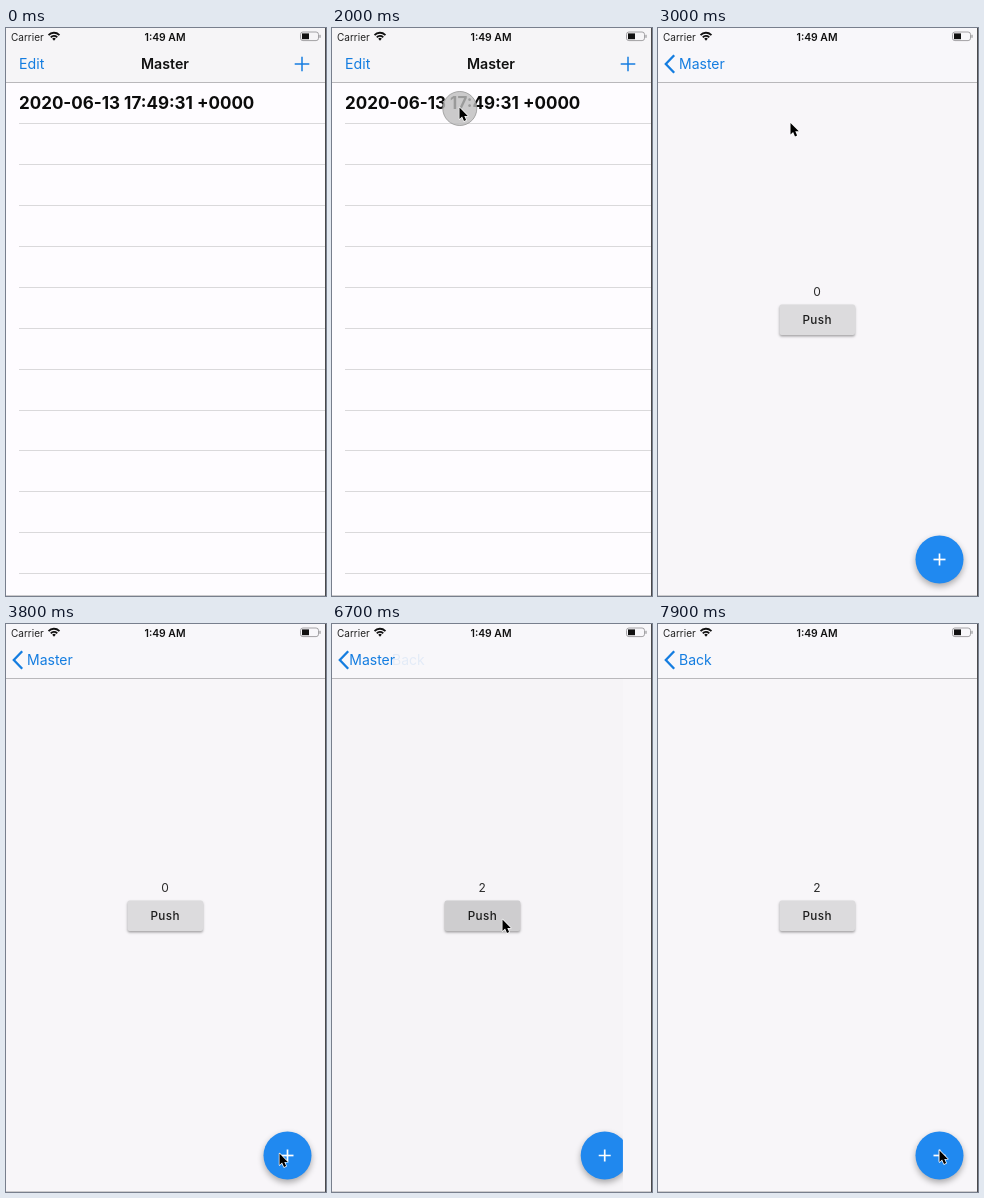
These frames come from a looping animation (320x568 px, 8 s). An HTML page with a canvas:

```html
<!DOCTYPE html>
<html lang="en">
<head>
<meta charset="utf-8">
<title>Master and detail</title>
<style>
html, body { margin: 0; width: 100%; height: 100%; overflow: hidden; }
canvas { display: block; width: 320px; height: 568px; }
</style>
</head>
<body>
<canvas id="stage"></canvas>
<script>
const W = 320, H = 568, LOOP = 8000, STEP = 100, BAR = 55;
const BLUE = '#147de0', PAPER = '#f8f6f9';
const canvas = document.getElementById('stage');
const ctx = canvas.getContext('2d');
const dpr = window.devicePixelRatio || 1;
canvas.width = W * dpr;
canvas.height = H * dpr;

// Pointer tip: time, x, y
const path = [
  [400, 10, 462], [500, 65, 347], [900, 65, 347], [1000, 88, 200],
  [1100, 107, 85], [1200, 107, 85], [1900, 127, 79], [2900, 127, 79],
  [3800, 273, 529], [4600, 273, 529], [4700, 271, 493], [4800, 208, 296],
  [4900, 208, 296], [5400, 183, 300], [5600, 183, 300], [6100, 170, 295],
  [6800, 170, 295], [7400, 240, 513], [7500, 240, 513], [7900, 281, 526]
];
const presses = [[1900, 2100], [3900, 4100], [4300, 4500]];

const mix = (a, b, k) => a + (b - a) * k;
const clamp = v => Math.max(0, Math.min(1, v));
const within = (t, a, b) => t >= a && t < b;

// Critically damped spring from 0 to 1
function spring(ms) {
  const x = Math.max(0, ms) * 0.024;
  const p = 1 - (1 + x) * Math.exp(-x);
  return p > 0.999 ? 1 : p;
}

function pointerAt(t) {
  if (t < path[0][0]) return null;
  const i = path.findIndex(k => k[0] > t);
  if (i < 0) return path[path.length - 1].slice(1);
  const [t0, x0, y0] = path[i - 1], [t1, x1, y1] = path[i];
  const u = (t - t0) / (t1 - t0), k = u * u * (3 - 2 * u);
  return [mix(x0, x1, k), mix(y0, y1, k)];
}

function text(str, x, y, size, { weight = 400, color = '#111', align = 'left', gap = 0, alpha = 1 } = {}) {
  ctx.save();
  ctx.globalAlpha *= clamp(alpha);
  ctx.font = `${weight} ${size}px Inter, Roboto, sans-serif`;
  ctx.letterSpacing = gap + 'px';
  ctx.textAlign = align;
  ctx.fillStyle = color;
  ctx.fillText(str, x, y);
  ctx.restore();
}

function rect(x, y, w, h, color) {
  ctx.fillStyle = color;
  ctx.fillRect(x, y, w, h);
}

function disc(x, y, r, color) {
  ctx.fillStyle = color;
  ctx.beginPath();
  ctx.arc(x, y, r, 0, 7);
  ctx.fill();
}

function stroke(points, width, color) {
  ctx.beginPath();
  points.forEach(([x, y]) => ctx.lineTo(x, y));
  ctx.lineWidth = width;
  ctx.strokeStyle = color;
  ctx.stroke();
}

function plus(x, y, r, width, color) {
  stroke([[x - r, y], [x + r, y]], width, color);
  stroke([[x, y - r], [x, y + r]], width, color);
}

function shadow(y, blur, alpha) {
  ctx.shadowColor = `rgba(0,0,0,${alpha})`;
  ctx.shadowOffsetY = y * dpr;
  ctx.shadowBlur = blur * dpr;
}

// Runs draw() shifted sideways and clipped to one screen
function page(x, draw) {
  ctx.save();
  ctx.translate(x, 0);
  ctx.beginPath();
  ctx.rect(0, BAR, W, H - BAR);
  ctx.clip();
  draw();
  ctx.restore();
}

function dim(k) {
  rect(0, BAR, W, H - BAR, `rgba(0,0,0,${0.1 * k})`);
}

function list(selected) {
  rect(0, BAR, W, H, '#fefcff');
  if (selected) rect(0, BAR, W, 40.5, '#c5c4c7');
  text('2020-06-13 17:49:31 +0000', 13, 81, 17, { weight: 700, color: selected ? '#fff' : '#0b0b0b' });
  for (let i = 1; i <= 12; i++) rect(13, Math.round(54.4 + 40.9 * i), W, 1, '#dad9db');
}

function detail(count, { pressed = false, splash = 0 } = {}) {
  rect(0, BAR, W, H, PAPER);
  text(count, 159, 268, 12, { align: 'center', color: '#2b2b2b' });
  ctx.save();
  shadow(1.5, 2.5, 0.35);
  ctx.beginPath();
  ctx.roundRect(121.5, 276.5, 75.5, 30.5, 2);
  ctx.fillStyle = pressed ? '#d0cfd1' : '#dcdbdd';
  ctx.fill();
  ctx.restore();
  text('Push', 159.2, 296, 11.7, { weight: 500, align: 'center', gap: 0.4, color: '#1c1c1c' });

  ctx.save();
  shadow(splash ? 5 : 3, splash ? 9 : 6, 0.32);
  disc(281.5, 531.5, 24, '#2089f0');
  ctx.restore();
  if (splash) disc(281.5, 531.5, 24 * splash, 'rgba(255,255,255,.15)');
  plus(281.5, 531.5, 6, 1.7, '#fff');
}

function statusBar() {
  text('Carrier', 5, 12.5, 10, { color: '#222' });
  text('1:49 AM', 159, 12.5, 10.4, { weight: 600, align: 'center' });
  ctx.lineWidth = 1.9;
  ctx.strokeStyle = '#111';
  for (const r of [4.4, 7.5]) {
    ctx.beginPath();
    ctx.arc(48, 12.3, r, -Math.PI * 0.76, -Math.PI * 0.24);
    ctx.stroke();
  }
  ctx.beginPath();
  ctx.moveTo(48, 12.8);
  ctx.arc(48, 12.3, 2.4, -Math.PI * 0.76, -Math.PI * 0.24);
  ctx.fillStyle = '#111';
  ctx.fill();
  ctx.beginPath();
  ctx.roundRect(294.5, 4, 18, 8.6, 2.4);
  ctx.lineWidth = 0.9;
  ctx.strokeStyle = '#99989b';
  ctx.stroke();
  rect(296, 5.4, 7, 5.8, '#111');
  rect(313.4, 6.8, 1.2, 3, '#99989b');
}

function navBar(push, next) {
  rect(0, 0, W, BAR, push > 0 ? '#f8f7fa' : '#f6f5f7');
  rect(0, 54, W, 1, '#b9b8bb');
  statusBar();
  const y = 41;
  if (push < 1) {
    ctx.save();
    ctx.globalAlpha = 1 - push;
    text('Edit', 13, y, 14.2, { color: BLUE });
    plus(296, 36, 7.3, 1.5, BLUE);
    ctx.restore();
    text('Master', mix(135, 21, push), y, 14.2, { weight: 600, alpha: 1 - push });
  }
  if (push > 0) {
    ctx.save();
    ctx.globalAlpha = push;
    stroke([[16.2, 27.3], [7.8, 36], [16.2, 44.7]], 2.3, BLUE);
    ctx.restore();
    text('Master', mix(135, 21, push) - 41 * next, y, 14, { color: BLUE, alpha: push * (1 - 1.3 * Math.max(0, next - 0.1)) * (next < 1) });
    if (next > 0) text('Back', mix(64, 21, next), y, 14, { color: BLUE, alpha: next });
  }
}

function pointer(t) {
  const tip = pointerAt(t);
  if (!tip) return;
  const [x, y] = tip;
  if (presses.some(([a, b]) => within(t, a, b))) {
    disc(x + 0.8, y + 1.5, 17, 'rgba(191,191,191,.8)');
    ctx.lineWidth = 1;
    ctx.strokeStyle = 'rgba(150,150,150,.8)';
    ctx.stroke();
  }
  ctx.save();
  ctx.translate(x, y);
  ctx.beginPath();
  [[0.5, 0.5], [0.5, 12], [3.1, 9.6], [5, 14], [7.1, 13.1], [5.3, 8.9], [8.8, 8.9]]
    .forEach(([px, py]) => ctx.lineTo(px, py));
  ctx.closePath();
  ctx.lineJoin = 'round';
  ctx.lineWidth = 1.4;
  ctx.strokeStyle = '#fff';
  ctx.stroke();
  ctx.fillStyle = '#000';
  ctx.fill();
  ctx.restore();
}

function draw(t) {
  const push = spring(t - 2080), next = spring(t - 6679);
  const count = t < 4100 ? 0 : t < 4500 ? 1 : 2;
  const tap = [3900, 4300].find(a => within(t, a, a + 300));
  const splash = tap ? (t - tap + 100) / 300 : 0;

  ctx.setTransform(dpr, 0, 0, dpr, 0, 0);
  rect(0, 0, W, H, PAPER);
  if (push < 1) page(-96 * push, () => { list(t >= 2100); dim(push); });
  if (push > 0 && next < 1) {
    page(W * (1 - push) - 96 * next, () => {
      detail(count, { pressed: next > 0, splash });
      dim(next);
    });
  }
  if (next > 0) page(W * (1 - next), () => detail(count));
  navBar(push, next);
  rect(0, H - 1, W, 1, '#cccbcd');
  rect(W - 1, 0, 1, H, '#4a4a4c');
  pointer(t);
}

function tick(now) {
  draw(Math.floor((now % LOOP) / STEP) * STEP);
  requestAnimationFrame(tick);
}
draw(0);
requestAnimationFrame(tick);
</script>
</body>
</html>
```
